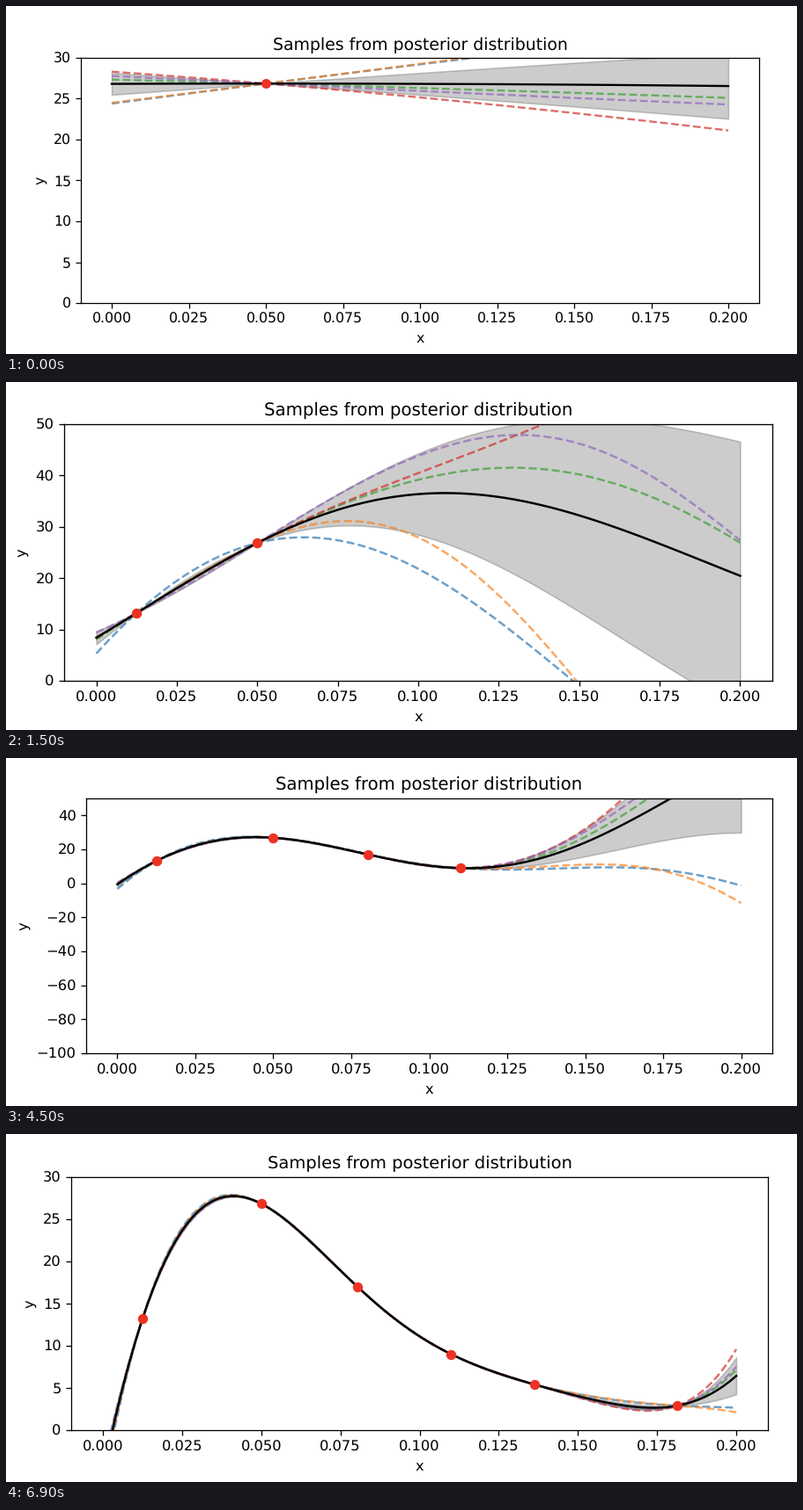
Recreate the animation shown at these times as a matplotlib script. Size 898 by 396 pixels, loop 7.5 s.

```python
import numpy as np
import matplotlib.pyplot as plt
from matplotlib.animation import FuncAnimation

W, H, DPI = 898, 396, 64
COLORS = ["#2d76b2", "#f78322", "#3e9f35", "#ce312d", "#9168ba"]
OBS_X = np.array([0.05, 0.0125, 0.0804, 0.11, 0.1364, 0.1814])
OBS_Y = np.array([26.85, 13.2, 17.0, 9.0, 5.4, 2.9])
GRID = np.linspace(0, 0.2, 100)

# observations seen, y limits, axes box (left, right, top, bottom) in pixels
SCENES = [
    (1, (0, 30), (85, 855, 59, 338)),
    (2, (0, 50), (66, 870, 48, 340)),
    (3, (-100, 50), (80, 870, 44, 339)),
    (4, (-100, 50), (91, 870, 46, 336)),
    (6, (0, 30), (74, 865, 49, 337)),
]


def rbf(a, b, length):
    return np.exp(-0.5 * ((a[:, None] - b) / length) ** 2)


def posterior(x, y):
    """Mean and covariance on GRID of a Gaussian process given x, y."""
    # one point says nothing about the length scale, so it stays at 1
    length = 1.0 if len(x) == 1 else 0.1
    corr = rbf(x, x, length) + 1e-12 * np.eye(len(x))
    cross = rbf(GRID, x, length)
    alpha = np.linalg.solve(corr, y)
    variance = y @ alpha / len(x)  # maximum likelihood
    half = np.linalg.solve(np.linalg.cholesky(corr), cross.T)
    cov = variance * (rbf(GRID, GRID, length) - half.T @ half)
    return cross @ alpha, cov


def set_scale(k):
    plt.rcParams.update({
        "font.family": "DejaVu Sans", "font.size": 10 * k,
        "text.hinting": "none",
        "axes.linewidth": 0.8 * k, "axes.titlepad": 6 * k,
        "axes.labelpad": 4 * k,
        "lines.linewidth": 1.5 * k, "lines.markersize": 6 * k,
        "lines.markeredgewidth": k, "patch.linewidth": k,
    })
    for axis in ("xtick", "ytick"):
        plt.rcParams.update({f"{axis}.major.size": 3.5 * k,
                             f"{axis}.major.width": 0.8 * k,
                             f"{axis}.major.pad": 3.5 * k})


def draw(i):
    n, ylim, (left, right, top, bottom) = SCENES[i]
    set_scale((bottom - top) / 246.3 * 100 / DPI)
    fig.clear()
    ax = fig.add_axes([left / W, 1 - bottom / H,
                       (right - left) / W, (bottom - top) / H])

    x, y = OBS_X[:n], OBS_Y[:n]
    mean, cov = posterior(x, y)
    std = np.sqrt(np.clip(np.diag(cov), 0, None))
    samples = np.random.RandomState(0).multivariate_normal(
        mean, cov, len(COLORS), check_valid="ignore")

    ax.fill_between(GRID, mean - std, mean + std, color="black", alpha=0.2)
    for sample, color in zip(samples, COLORS):
        ax.plot(GRID, sample, "--", color=color, alpha=0.7)
    ax.plot(GRID, mean, color="black")
    ax.plot(x, y, "o", color="#ec3323")

    ax.set(xlim=(-0.01, 0.21), ylim=ylim, xlabel="x", ylabel="y",
           title="Samples from posterior distribution")
    return []


fig = plt.figure(figsize=(W / DPI, H / DPI), dpi=DPI, facecolor="white")
anim = FuncAnimation(fig, draw, frames=len(SCENES), interval=1500,
                     repeat=True, repeat_delay=0)
plt.show()
```
